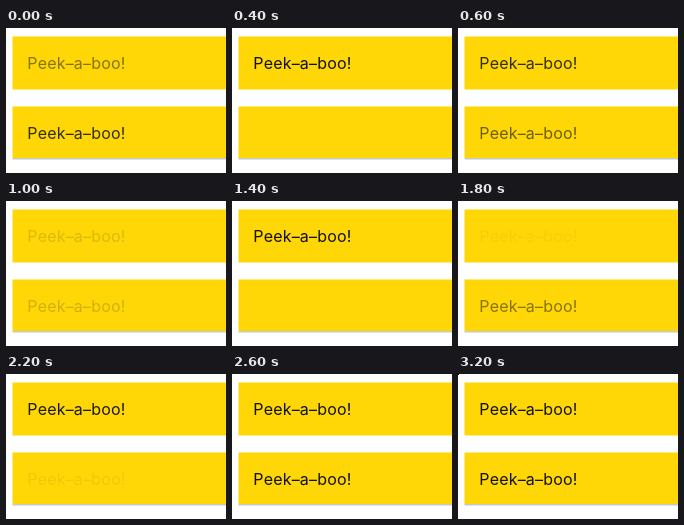
Recreate the animation shown at these times as an HTML page. Size 220 px wide and 145 px high, loop 3.4 s.

```html
<!DOCTYPE html>
<html lang="en">
<head>
<meta charset="utf-8">
<title>Peek–a–boo</title>
<style>
  html, body { margin: 0; width: 100%; height: 100%; overflow: hidden; background: #fff; }
  svg { display: block; width: 220px; height: 145px; }
  text { font: 400 16px Inter, "Noto Sans", sans-serif; letter-spacing: .2px; fill: #111; }
</style>
</head>
<body>
<svg viewBox="0 0 220 145">
  <rect width="220" height="145" fill="#fff"/>
  <rect x="6.5" y="8.5" width="214" height="53" fill="#ffd707"/>
  <rect x="6.5" y="78.5" width="214" height="51.5" fill="#ffd707"/>
  <rect x="6.5" y="130" width="214" height="1.5" fill="#c8c8c8"/>
  <text id="upper" x="21.3" y="41">Peek–a–boo!</text>
  <text id="lower" x="21.3" y="111">Peek–a–boo!</text>
  <rect id="dot" width="1" height="1" fill="#000"/>
</svg>
<script>
  const LOOP = 3400, STEP = 200, SETTLED = 2600, DOT_START = 2800;
  const $ = id => document.getElementById(id);
  const upper = $("upper"), lower = $("lower"), dot = $("dot");

  // Smooth bump: 1 at its centre, 0 from half a width away.
  function pulse(t, centre, half) {
    const d = Math.min(1, Math.abs(t - centre) / half);
    return Math.cos(d * Math.PI / 2) ** 2;
  }

  const hidden = t => pulse(t, -200, 400) + pulse(t, 900, 400) + pulse(t, 1850, 400);

  const shown = t => pulse(t, -100, 400) + pulse(t, 750, 350)
    + pulse(t, 1950, 300) + pulse(t, SETTLED, 200);

  function draw(ms) {
    const held = Math.floor(ms % LOOP / STEP) * STEP;
    const t = Math.min(held, SETTLED);
    upper.setAttribute("opacity", 1 - hidden(t));
    lower.setAttribute("opacity", shown(t));
    dot.setAttribute("opacity", held >= DOT_START ? 1 : 0);
  }

  const start = performance.now();
  function tick() {
    draw(performance.now() - start);
    requestAnimationFrame(tick);
  }
  tick();
</script>
</body>
</html>
```
